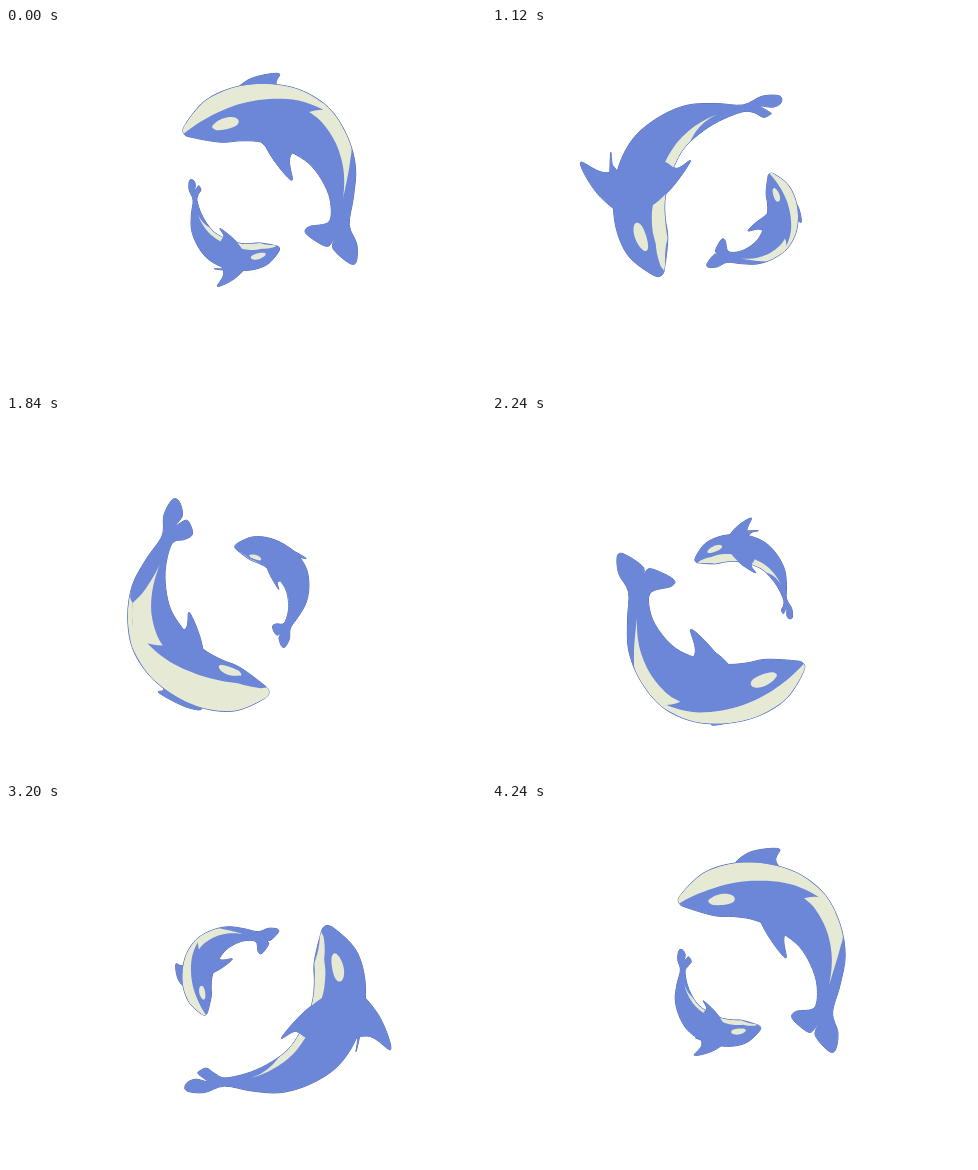
Animation of 480 by 360 pixels, one loop 4320 ms. Source, as an HTML page with a canvas:

```html
<!DOCTYPE html>
<html lang="en">
<head>
<meta charset="utf-8">
<title>Two orcas circling</title>
<style>
html, body { margin: 0; width: 100%; height: 100%; overflow: hidden; background: #fff; }
canvas { display: block; }
</style>
</head>
<body>
<canvas id="stage" width="480" height="360"></canvas>
<script>
const ctx = document.getElementById('stage').getContext('2d');
const BLUE = '#6c86d8', CREAM = '#e6ead4', EDGE = '#5069ae';
const LOOP = 4320, ROLL = LOOP / 2, STEP = 80, CX = 240.5, CY = 180.5;
const BIG = { scale: 1, lag: 0, side: 0 };
const SMALL = { scale: .52, lag: ROLL / 2, side: 180 };

// Body edges as distances from the orbit centre, evenly spaced from head to tail.
const HEAD = 126, SPAN = 135, MIDDLE = 97;
const OUTER = [104, 115, 120, 123, 126, 126, 121, 115, 107, 104];
const INNER = [87, 71, 68, 68, 69, 72, 77, 81, 86, 90];

// All angles are in degrees.
const sin = d => Math.sin(d * Math.PI / 180);
const cos = d => Math.cos(d * Math.PI / 180);
const clamp = (x, lo, hi) => Math.min(hi, Math.max(lo, x));
const mix = (a, b, k) => a + (b - a) * k;

function sample(list, u) {
  const x = u * (list.length - 1), i = Math.min(Math.floor(x), list.length - 2);
  return mix(list[i], list[i + 1], x - i);
}

// Smooth closed curve through the points.
function smooth(pts) {
  const path = new Path2D(), n = pts.length, at = i => pts[(i + n) % n];
  path.moveTo(...pts[0]);
  for (let i = 0; i < n; i++) {
    const [a, b, c, d] = [at(i - 1), at(i), at(i + 1), at(i + 2)];
    path.bezierCurveTo(
      b[0] + (c[0] - a[0]) / 6, b[1] + (c[1] - a[1]) / 6,
      c[0] - (d[0] - b[0]) / 6, c[1] - (d[1] - b[1]) / 6, c[0], c[1]);
  }
  path.closePath();
  return path;
}

function polygon(pts) {
  const path = new Path2D();
  pts.forEach(p => path.lineTo(...p));
  path.closePath();
  return path;
}

function drawWhale(t, { scale, lag, side }) {
  const p = (t + lag) / ROLL * 360;
  const roll = p - 6 - 10 * sin(p) - 15 * sin(2 * p);
  const wave = cos(p - 45);
  const heading = t / LOOP * 360 + side;

  const put = (a, r) => [
    CX + scale * r * cos(a + heading),
    CY - scale * r * sin(a + heading)];

  function edges(a) {
    const u = clamp((HEAD - a) / SPAN, 0, 1);
    return [
      sample(INNER, u) - 9 * wave * u ** 10,
      sample(OUTER, u) + 6 * wave * sin(180 * u) ** 2];
  }

  function body() {
    const stations = OUTER.map((_, i) => HEAD - SPAN * i / (OUTER.length - 1));
    const notch = 99 - 9 * wave, tip = 81 - 22 * wave;
    const flukes = [
      [-18, 116], [-26, 122], [-28, 116], [-25, notch + 3], [-18.5, notch],
      [-25, notch - 3], [-25, mix(tip, notch, .33)], [-22, tip - 2], [-16, tip]];
    return smooth([
      [130, 97],
      ...stations.map(a => [a, edges(a)[1]]),
      ...flukes,
      ...stations.reverse().map(a => [a, edges(a)[0]])
    ].map(q => put(...q)));
  }

  // A marking on the round body: girth(s) gives its middle and half-width
  // around the body; the part turned away from the viewer is cut off.
  function band(from, to, girth) {
    const near = [], far = [], steps = 32;
    for (let i = 0; i <= steps; i++) {
      const s = i / steps, a = mix(from, to, s);
      const [middle, half] = girth(s), [inner, outer] = edges(a);
      const facing = ((middle - roll + 90) % 360 + 360) % 360 - 90;
      const spot = d => put(a, mix(inner, outer, (1 + cos(clamp(d, 0, 180))) / 2));
      near.push(spot(facing - half));
      far.unshift(spot(facing + half));
    }
    return polygon([...near, ...far]);
  }

  const belly = () => band(131, 42, s => [0, 70 * (1 - .8 * s ** 2.5)]);

  const flank = sign => band(57, 6, s => {
    const low = Math.max(-2, 55 * (1 - 5 * s), 78 * Math.sqrt(Math.max(0, (s - .55) / .45)));
    const high = 55 + 23 * s * s;
    return [sign * (low + high) / 2, Math.max(0, high - low) / 2];
  });

  const eye = sign => band(113, 95, s => [sign * 100, 28 * Math.sqrt(s * (1 - s))]);

  // reach: how far the tip stands out from the middle line of the body.
  function fin(girth, tipAngle, reach, width) {
    const root = 60 + .25 * tipAngle;
    const base = MIDDLE + 20 * cos(girth - roll) + .12 * reach;
    const front = put(root + width, base), back = put(root - width, base);
    const tip = put(tipAngle, MIDDLE + reach);
    const bend = (from, k) => from.map((x, i) => mix(x, tip[i], .6) + k * (front[i] - back[i]));
    return smooth([front, bend(front, .25), tip, bend(back, .15), back]);
  }

  const q = p - 138, w = p + 20;
  const left = fin(65, 51 + 19 * cos(p - 190),
    56 * cos(q) - 20 * cos(3 * q) + 10 * cos(2 * p + 20), 15);
  const right = fin(-65, 57 + 21 * cos(w), -5 + 40 * cos(w) + 12 * cos(2 * w), 15);
  const dorsal = fin(180, 62, 42 * cos(p - 215), 6);
  const trunk = body(), blue = [trunk, left, right, dorsal];

  ctx.lineWidth = 1;
  ctx.strokeStyle = EDGE;
  blue.forEach(path => ctx.stroke(path));
  ctx.fillStyle = BLUE;
  blue.forEach(path => ctx.fill(path));

  ctx.save();
  ctx.clip(trunk);
  ctx.fillStyle = CREAM;
  [belly(), flank(1), flank(-1), eye(1), eye(-1)].forEach(path => ctx.fill(path));
  ctx.restore();

  ctx.fillStyle = BLUE;
  ctx.fill(cos(p) > 0 ? left : right);
}

const start = performance.now();
function frame() {
  const t = Math.floor((performance.now() - start) % LOOP / STEP) * STEP;
  ctx.fillStyle = '#fff';
  ctx.fillRect(0, 0, 480, 360);
  drawWhale(t, BIG);
  drawWhale(t, SMALL);
  requestAnimationFrame(frame);
}
frame();
</script>
</body>
</html>
```
